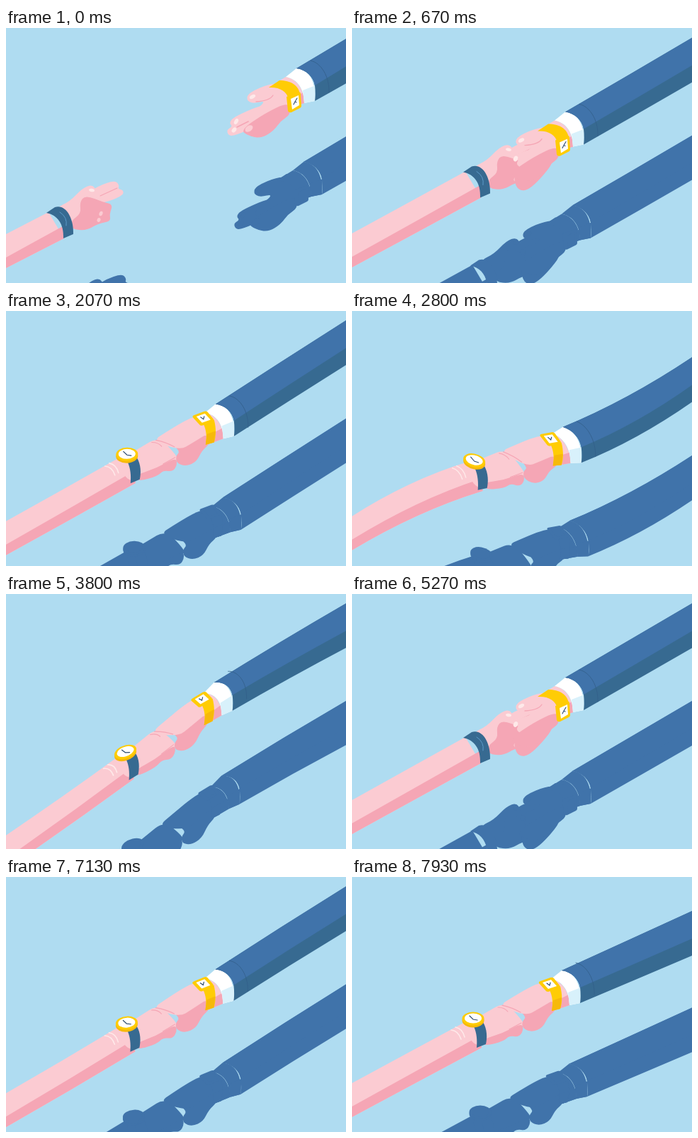
Animation, 480 px wide and 360 px high, one loop 8000 ms. Source, as an HTML page with a canvas:

```html
<!DOCTYPE html>
<html lang="en">
<head>
<meta charset="utf-8">
<title>Handshake</title>
<style>
html, body { margin: 0; width: 100%; height: 100%; overflow: hidden; background: #afdcf1; }
canvas { display: block; }
</style>
</head>
<body>
<canvas width="480" height="360"></canvas>
<script>
const ctx = document.querySelector('canvas').getContext('2d');
const SKY = '#afdcf1', BLUE = '#4073aa', NAVY = '#376a91', SKIN = '#fbcbd2', ROSE = '#f5a6b5',
  NAIL = '#fee9e9', WHITE = '#ffffff', ICE = '#d8f1fb', GOLD = '#ffcc05', AMBER = '#f6b90a', INK = '#2c4a6e';
const LOOP = 8000, CYCLE = 5000, FPS = 15;
let inShadow = false;

// ---------- drawing helpers ----------
function fill(color, path) {
  ctx.fillStyle = inShadow ? BLUE : color;
  ctx.fill(new Path2D(path));
}

function line(color, width, path) {
  if (inShadow) return;
  ctx.strokeStyle = color;
  ctx.lineWidth = width;
  ctx.lineCap = 'round';
  ctx.stroke(new Path2D(path));
}

// Smooth closed shape steered by a ring of control points.
function blob(color, points) {
  const n = points.split(' ').map(Number), count = n.length / 2;
  const corner = i => [n[i % count * 2], n[i % count * 2 + 1]];
  const mid = i => corner(i).map((v, axis) => (v + corner(i + 1)[axis]) / 2);
  let path = 'M' + mid(0);
  for (let i = 1; i <= count; i++) path += `Q${corner(i)} ${mid(i)}`;
  fill(color, path + 'Z');
}

function oval(color, x, y, rx, ry, turn = 0) {
  ctx.beginPath();
  ctx.ellipse(x, y, rx, ry, turn, 0, 7);
  ctx.fillStyle = inShadow ? BLUE : color;
  ctx.fill();
}

function at([x, y], draw) {
  ctx.save();
  ctx.translate(x, y);
  draw();
  ctx.restore();
}

// ---------- accessories, relative to the sleeve corner or the forearm end ----------
function drawCuff() {
  fill(SKIN, 'M-38 26L-15 12C0 15 10 28 11 49L-12 57Z');
  fill(ROSE, 'M-8 43L10 34L11 49L-12 57Z');
  fill(WHITE, 'M-15 12L0 0C20 2 28 22 26 46L11 49C11 30 2 15 -15 12Z');
  fill(ICE, 'M9 31L27 24L26 46L11 49Z');
}

function drawSideWatch() {
  fill(GOLD, 'M-39 27L-24 17C-8 17 3 24 5 36L-11 43C-14 32 -24 26 -39 27Z');
  fill(GOLD, 'M-14 40L3 34Q6 33 6 36L7 53Q7 55 5 56L-7 62Q-11 63 -12 60Z');
  fill(WHITE, 'M-8 43L3 38L4 52L-6 58Z');
  line(INK, 1.1, 'M-4 51L-2 47L1 42M-2 47L0 48');
}

function drawStrap() {
  fill(NAVY, 'M0 0L12 -8C27 -13 39 7 38 30L24 36C25 16 16 3 0 0Z');
  line('#5d9bc9', 1, 'M19 -1Q30 6 28 18');
}

// ---------- hands with pointing fingers ----------
function openLeftFingers() {
  blob(SKIN, '112 236 130 223 154 215 160 222 158 227 166 229 165 237 130 250');
  line(ROSE, 1.2, 'M133 237L157 226');
}

function openRightFingers() {
  blob(SKIN, '372 104 322 125 315 134 320 139 311 144 315 153 328 150 374 130');
  line(ROSE, 1.4, 'M326 140L352 127');
  oval(NAIL, 325, 132, 2.6, 4.4, .5);
  oval(NAIL, 322, 144, 2.8, 4, .7);
}

function openLeftPalm() {
  blob(SKIN, '70 254 90 245 108 226 122 221 128 230 134 260 92 282 84 272');
  blob(ROSE, '104 246 112 236 138 246 151 249 146 263 148 273 130 276 114 286 92 284 92 272 106 262');
  oval(NAIL, 121, 229, 4, 2.2, .2);
  oval(SKIN, 134, 262, 2.4, 3.4, .4);
  oval(SKIN, 131, 271, 2.4, 3, .4);
}

function openRightPalm(gap) {
  const gripping = gap < .3;
  if (gripping) blob(ROSE, '376 128 342 132 337 152 344 169 362 166 398 124');
  blob(SKIN, '394 80 374 78 343 91 339 101 348 107 368 102 350 118 338 132 360 140 398 122 404 92');
  blob(ROSE, '400 104 366 120 331 144 342 152 360 156 378 145 388 131 402 122');
  if (gripping) oval(NAIL, 340, 123, 3, 4, .4);
  else oval(SKIN, 343, 142, 6, 4, -.6);
  line(ROSE, 1.3, 'M353 104Q372 103 377 95');
  oval(NAIL, 348, 97, 4.5, 2.6, -.5);
}

// ---------- hands in a thumb clasp ----------
function claspLeft() {
  blob(ROSE, '198 202 212 194 224 205 216 222 204 214');
  blob(SKIN, '178 190 196 178 203 164 218 153 234 149 242 160 206 210 194 205');
}

function claspRight() {
  blob(ROSE, '216 172 230 161 246 162 272 172 288 190 286 208 252 237 236 242 216 237 211 224 218 212 211 198');
  blob(SKIN, '256 170 274 172 285 187 258 200 253 184');
  blob(SKIN, '224 160 236 150 250 148 261 162 252 168 226 174');
  oval(NAIL, 240, 162, 3.2, 4.2, .3);
  oval(NAIL, 228, 156, 4, 2.4, -.3);
  for (let i = 0; i < 3; i++) oval(SKIN, 247, 175 + 11.5 * i, 2.8, 3.8, .3);
}

// ---------- hands seen from the back ----------
function shakeLeft() {
  blob(SKIN, '160 208 190 191 216 176 241 203 243 211 192 234 176 239 164 226');
  blob(ROSE, '184 229 212 221 240 206 242 216 236 226 222 224 214 232 186 239');
  line(ROSE, 1.1, 'M206 184Q215 184 220 190M222 215L239 206');
  line(NAIL, 1.6, 'M140 216Q150 217 154 229M146 212Q156 214 159 226');
  fill(NAVY, 'M172 211L185 205C191 215 191 227 189 236L176 241C177 230 176 220 172 211Z');
  oval(AMBER, 171, 202.5, 15.5, 10);
  oval(GOLD, 171, 200, 15.5, 9.5);
  oval(WHITE, 171, 199.5, 12, 7);
  line(INK, 1.2, 'M166 196L171 201L177 202');
}

function shakeRight() {
  blob(ROSE, '236 188 292 172 288 188 277 197 269 213 254 219 241 214 240 204 246 198');
  blob(SKIN, '207 182 226 170 250 156 268 148 286 152 294 168 262 187 246 196');
  line(ROSE, 1.3, 'M212 181Q226 184 238 191');
  fill(GOLD, 'M279 160L294 154C297 166 297 177 294 186L282 189C284 178 283 168 279 160Z');
  fill(AMBER, 'M284 174L296 170L294 186L282 189Z');
  fill(GOLD, 'M266 147L280 142Q283 141 285 143L293 153Q294 156 291 157L277 162Q274 162 273 160L264 150Q263 148 266 147Z');
  fill(WHITE, 'M269 149L281 145L289 154L277 158Z');
  line(INK, 1.2, 'M275 150L279 153L280 149');
}

// `home` is the gap at which a pose's own coordinates apply.
const none = () => {};
const OPEN = { sleeve: [410, 57], wrist: [57, 261], home: 1, sideView: true,
  leftBack: openLeftFingers, rightBack: openRightFingers, left: openLeftPalm, right: openRightPalm };
const CLASP = { sleeve: [295, 146], wrist: [170, 193], home: 0, sideView: true,
  leftBack: none, rightBack: none, left: claspLeft, right: claspRight };
const SHAKE = { sleeve: [296, 132], wrist: [158, 205], home: 0, sideView: false,
  leftBack: none, rightBack: none, left: shakeLeft, right: shakeRight };

// ---------- motion ----------
const GRIP = 267, PUMP = 426.4, PUMP_END = GRIP + 4 * PUMP;

const ease = u => (1 - Math.cos(Math.PI * Math.min(1, Math.max(0, u)))) / 2;
const ramp = (from, to, time) => ease((time - from) / (to - from));

// time, y, skew, right shoulder, left shoulder, bend
const SHAKE_KEYS = [
  [PUMP_END, 0, 0, 13, 292, 0],
  [2400, 9, -.2, 13, 335, -2],
  [2800, 20, .167, 65, 290, 6],
  [3067, -20, -.167, 31, 292, -6],
  [3300, 14, .05, 45, 305, 3],
  [3470, 2, -.2, 15, 330, -2],
  [3800, 10, -.24, 13, 341, -1],
  [4400, 0, 0, 13, 292, 0]
];

function poseAt(time) {
  if (time < 930 || time >= 4500) return OPEN;
  return time < PUMP_END ? CLASP : SHAKE;
}

function stateAt(time) {
  const pose = poseAt(time);
  const gap = 1 - ramp(0, GRIP, time) + 1.2 * ramp(3900, 4400, time) - .2 * ramp(4500, CYCLE, time);
  let y = 0, skew = 0, rightY = 13 + 2 * Math.min(1, gap), leftY = 291, bend = 0;
  if (time > GRIP && time < PUMP_END) {
    const pump = (1 - Math.cos((time - GRIP) / PUMP * 2 * Math.PI)) / 2;
    y = 14 * (pose === OPEN ? pump : pump - 1);
    rightY = 13 + 16 * pump;
    leftY = 290 + 3 * pump;
    bend = 6 * pump;
  } else if (time >= PUMP_END && time < 4400) {
    const next = SHAKE_KEYS.findIndex(key => key[0] > time);
    const from = SHAKE_KEYS[next - 1], to = SHAKE_KEYS[next];
    const u = ramp(from[0], to[0], time);
    [, y, skew, rightY, leftY, bend] = from.map((value, i) => value + (to[i] - value) * u);
  }
  return { pose, gap, x: 10 * skew, y, skew, rightY, leftY,
    rightSag: bend, leftSag: bend * (pose === SHAKE ? -1.15 : .7) };
}

// Curved edge from a to b, for use after a move or line command.
const edge = (a, b, sag) => `Q${(a[0] + b[0]) / 2} ${(a[1] + b[1]) / 2 + 2 * sag} ${b}`;

function drawFigure({ pose, gap, x, y, skew, rightY, leftY, rightSag, leftSag }) {
  const spread = gap - pose.home;
  const rightShift = [109 * spread, -61 * spread], leftShift = [-100 * spread, 58 * spread];
  const place = (base, shift, px, py) => {
    const sx = base[0] + shift[0] + px;
    return [sx + x, base[1] + shift[1] + py + y + skew * (sx - 225)];
  };
  const posed = (shift, draw) => {
    ctx.save();
    ctx.transform(1, skew, 0, 1, x, y - 225 * skew);
    at(shift, draw);
    ctx.restore();
  };

  const wrist = (px, py) => place(pose.wrist, leftShift, px, py);
  const forearm = (color, offset, top) => {
    const elbow = [-2, leftY + offset + 1], under = [-2, leftY + 49], bottom = wrist(25, 36);
    fill(color, `M${elbow}${edge(elbow, top, leftSag)}L${bottom}${edge(bottom, under, leftSag)}Z`);
  };
  forearm(SKIN, 0, wrist(3, -1));
  forearm(ROSE, 33, wrist(23, 19));

  posed(leftShift, pose.leftBack);
  posed(rightShift, () => at(pose.sleeve, drawCuff));

  const sleeve = (px, py) => place(pose.sleeve, rightShift, px, py);
  const curve = (...points) => 'C' + points.map(p => sleeve(...p)).join(' ');
  const shoulder = offset => [482, rightY + offset - 1];
  const top = sleeve(0, 0), seam = sleeve(26, 24), bottom = sleeve(26, 46);
  const upper = `M${top}${edge(top, shoulder(0), rightSag)}L`;
  const opening = curve([24, 12], [14, 2], [0, 0]) + 'Z';
  fill(NAVY, upper + shoulder(63) + edge(shoulder(63), bottom, rightSag) + curve([27, 40], [27, 32], [26, 24]) + opening);
  fill(BLUE, upper + shoulder(39) + edge(shoulder(39), seam, rightSag) + opening);
  line('#335f89', .8, 'M' + sleeve(20, -11) + curve([35, -8], [47, 12], [46, 34]));

  posed(rightShift, pose.rightBack);
  posed(leftShift, pose.left);
  if (pose.sideView) posed(leftShift, () => at(pose.wrist, drawStrap));
  posed(rightShift, () => pose.right(gap));
  if (pose.sideView) posed(rightShift, () => at(pose.sleeve, drawSideWatch));
}

function render(elapsed) {
  const frame = Math.floor((elapsed % LOOP + 4) * FPS / 1000);
  const state = stateAt(frame * 1000 / FPS % LOOP % CYCLE);
  ctx.fillStyle = SKY;
  ctx.fillRect(0, 0, 480, 360);
  // The cast shadow is the same silhouette; its sleeve end lies beyond the stage.
  inShadow = true;
  at([10, 132], () => drawFigure(state));
  inShadow = false;
  drawFigure(state);
}

const start = performance.now();
function tick() {
  render(performance.now() - start);
  requestAnimationFrame(tick);
}
tick();
</script>
</body>
</html>
```
